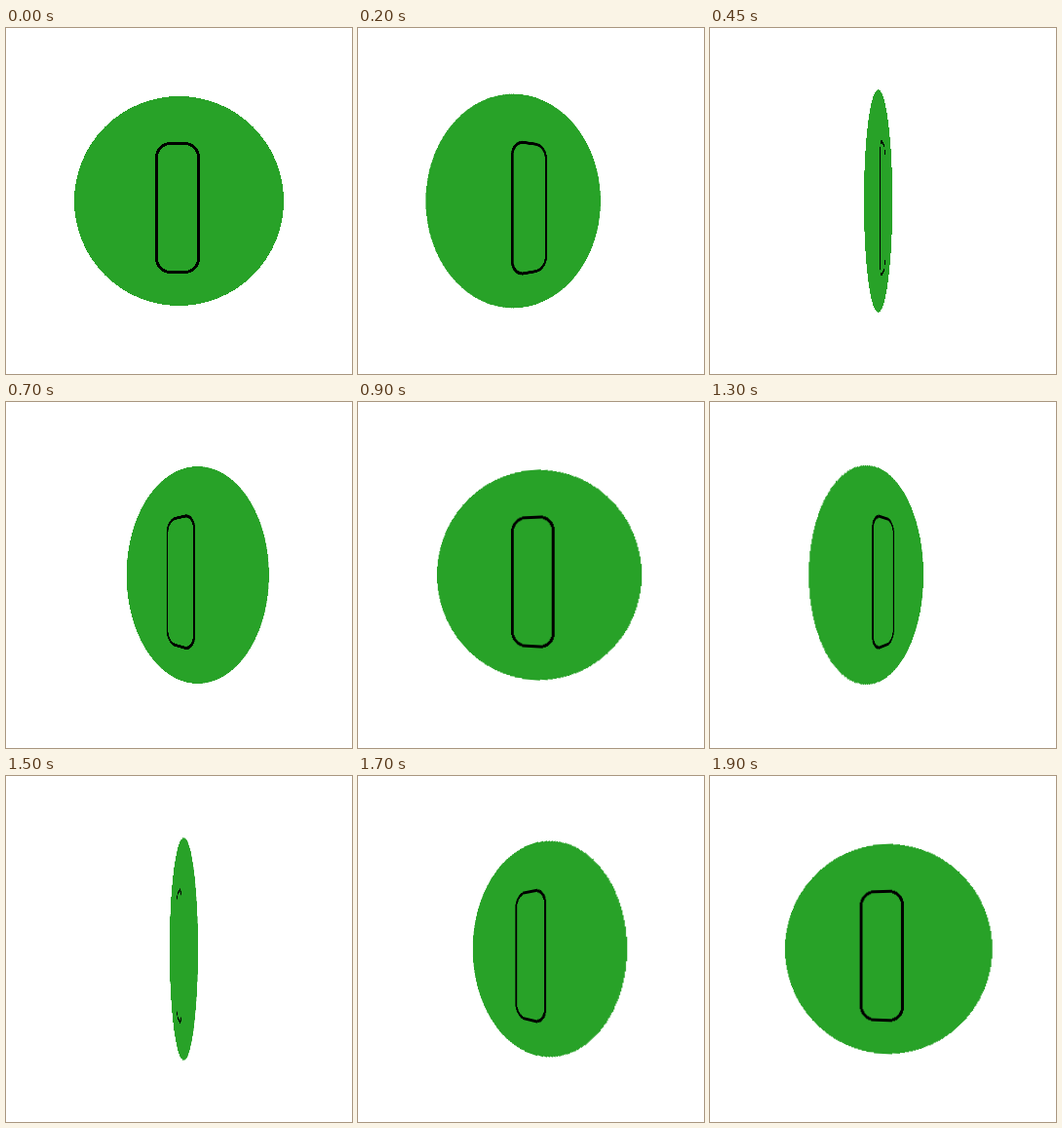
Recreate the animation shown at these times as an HTML page. Size 355 px wide and 355 px high, loop 1.95 s.

```html
<!DOCTYPE html>
<html lang="en">
<head>
<meta charset="utf-8">
<title>Spinning coin</title>
<style>
  html, body {
    margin: 0;
    width: 100%;
    height: 100%;
    overflow: hidden;
    background: #fff;
  }
  .stage {
    width: 355px;
    height: 355px;
    perspective: 316px;
  }
  .coin {
    display: block;
    width: 355px;
    height: 355px;
    shape-rendering: crispEdges;
    /* 39 poses of 50 ms each */
    animation: spin 1950ms steps(39) infinite;
  }
  .disc {
    fill: #28a228;
  }
  .emblem {
    fill: #28a228;
    stroke: #000;
    stroke-width: 3;
  }
  @keyframes spin {
    from { transform: rotateY(0deg); }
    to { transform: rotateY(360deg); }
  }
</style>
</head>
<body>
<div class="stage">
  <svg class="coin" viewBox="0 0 355 355">
    <circle class="disc" cx="177.5" cy="177.5" r="107.5"/>
    <rect class="emblem" x="154.5" y="118.5" width="43" height="132" rx="14"/>
  </svg>
</div>
</body>
</html>
```
